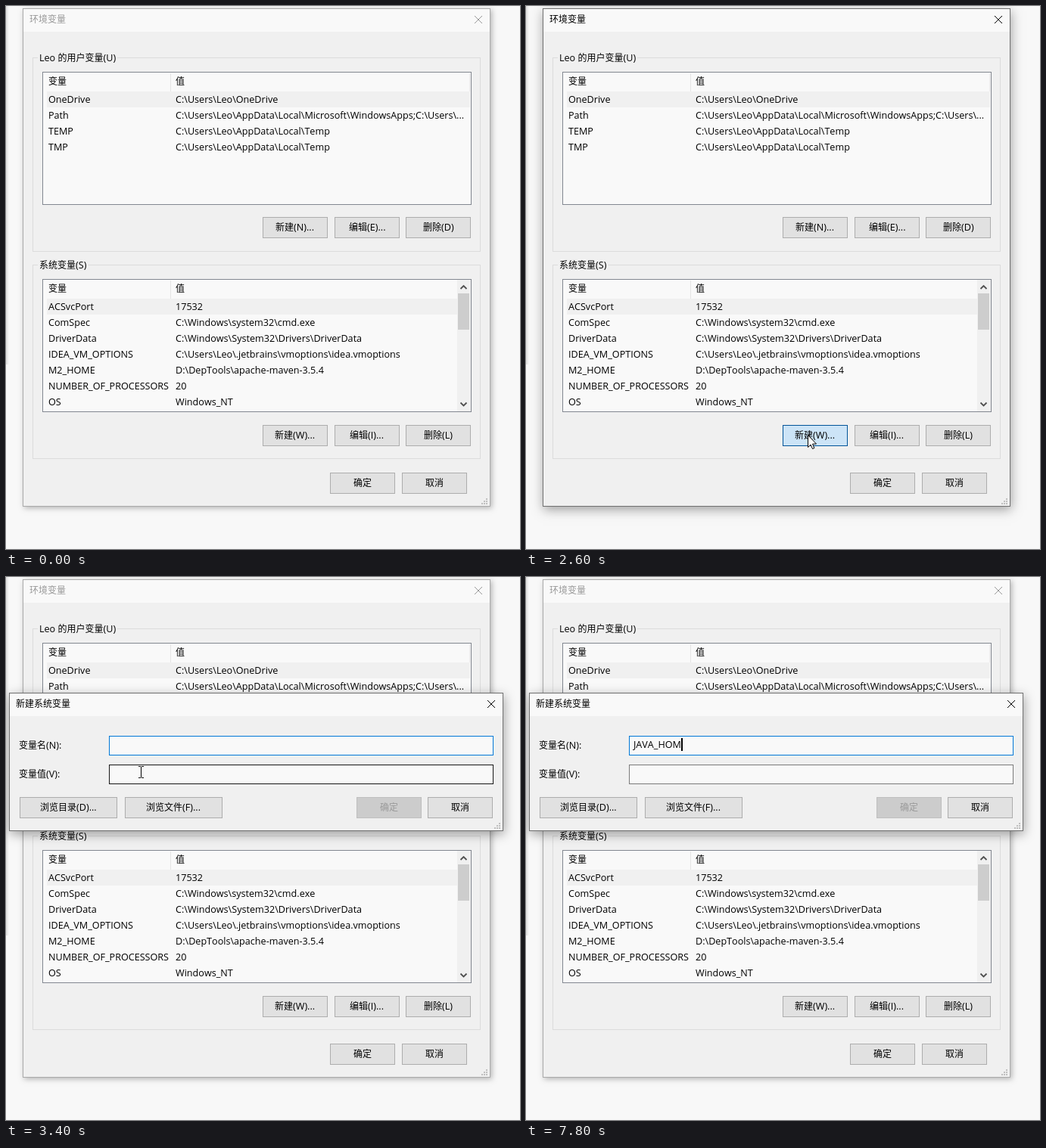
An HTML page with a canvas for the animation above (8000 ms loop, 679 px wide and 718 px high).

```html
<!DOCTYPE html>
<html lang="zh-CN">
<head>
<meta charset="utf-8">
<style>
html, body { margin: 0; width: 100%; height: 100%; overflow: hidden; background: #f8f8f8; }
canvas { display: block; }
</style>
</head>
<body>
<canvas id="stage" width="679" height="718"></canvas>
<script>
const stage = document.getElementById('stage').getContext('2d');
const layer = stage.canvas.cloneNode().getContext('2d');
let ctx = stage;
const LOOP = 8000, STEP = 100;
const LATIN = '12.6px "Open Sans", "Noto Sans", sans-serif';
const HAN = '12px "Noto Sans CJK SC", "Noto Sans CJK", sans-serif';
const PAPER = '#f9f9f9', FACE = '#f0f0f0', BLUE = '#0078d7';

const userVars = [
  ['OneDrive', 'C:\\Users\\Leo\\OneDrive'],
  ['Path', 'C:\\Users\\Leo\\AppData\\Local\\Microsoft\\WindowsApps;C:\\Users\\...'],
  ['TEMP', 'C:\\Users\\Leo\\AppData\\Local\\Temp'],
  ['TMP', 'C:\\Users\\Leo\\AppData\\Local\\Temp']
];
const systemVars = [
  ['ACSvcPort', '17532'],
  ['ComSpec', 'C:\\Windows\\system32\\cmd.exe'],
  ['DriverData', 'C:\\Windows\\System32\\Drivers\\DriverData'],
  ['IDEA_VM_OPTIONS', 'C:\\Users\\Leo\\.jetbrains\\vmoptions\\idea.vmoptions'],
  ['M2_HOME', 'D:\\DepTools\\apache-maven-3.5.4'],
  ['NUMBER_OF_PROCESSORS', '20'],
  ['OS', 'Windows_NT']
];

// time, x, y of the pointer tip
const pointerPath = [
  [200, 631, 185], [400, 631, 185], [500, 628, 176], [1300, 392, 572],
  [1400, 388, 576], [1500, 372, 575], [1600, 362, 570], [1700, 372, 567],
  [2900, 372, 567], [3400, 178, 258], [4000, 182, 227], [LOOP, 182, 227]
];
const typed = 'JAVA_HOM';
const keyTimes = [5300, 5500, 5700, 5800, 7000, 7400, 7500, 7800];
// spans in which the caret shows
const caretOn = [[2800, 3400], [4400, 4900], [5300, 6300], [6800, LOOP]];

function rect(x, y, w, h, color) {
  ctx.fillStyle = color;
  ctx.fillRect(x, y, w, h);
}

function box(x, y, w, h, fill, border) {
  rect(x, y, w, h, border);
  rect(x + 1, y + 1, w - 2, h - 2, fill);
}

function line(points, color, width = 1) {
  ctx.beginPath();
  points.forEach(([x, y]) => ctx.lineTo(x, y));
  ctx.strokeStyle = color;
  ctx.lineWidth = width;
  ctx.stroke();
}

// Splits Chinese and Latin runs, which differ in size
function runs(str) {
  return str.match(/[\u4e00-\u9fff]+|[^\u4e00-\u9fff]+/g) || [];
}

function setFont(run) {
  ctx.font = /[\u4e00-\u9fff]/.test(run) ? HAN : LATIN;
  ctx.fontKerning = 'none';
}

function measure(str) {
  return runs(str).reduce((w, run) => (setFont(run), w + ctx.measureText(run).width), 0);
}

function text(str, x, y, color = '#000') {
  for (const run of runs(str)) {
    setFont(run);
    ctx.fillStyle = color;
    ctx.fillText(run, x, y + 4);
    x += ctx.measureText(run).width;
  }
}

function button(label, x, y, w, look = 'normal') {
  const [fill, border, ink] = {
    normal: ['#e1e1e1', '#adadad', '#000'],
    hover: ['#e5f1fb', BLUE, '#000'],
    pressed: ['#cce4f7', '#005499', '#000'],
    disabled: ['#cccccc', '#bfbfbf', '#9a9a9a']
  }[look];
  box(x, y, w, 28, fill, border);
  text(label, Math.round(x + (w - measure(label)) / 2), y + 14, ink);
}

function frame(x, y, w, h, title, active) {
  ctx.save();
  ctx.shadowColor = active ? 'rgba(0,0,0,.36)' : 'rgba(0,0,0,.28)';
  ctx.shadowBlur = active ? 14 : 7;
  ctx.shadowOffsetX = active ? 1 : 2;
  ctx.shadowOffsetY = active ? 4 : 2;
  rect(x, y, w, h, active ? '#707070' : '#aaaaaa');
  ctx.restore();
  rect(x + 1, y + 1, w - 2, h - 2, FACE);
  rect(x + 1, y + 1, w - 2, 30, PAPER);
  const ink = active ? '#000' : '#999';
  text(title, x + 9, y + 15, ink);
  const cx = x + w - 16, cy = y + 15;
  line([[cx - 5, cy - 5], [cx + 5, cy + 5]], ink);
  line([[cx + 5, cy - 5], [cx - 5, cy + 5]], ink);
  for (let i = 0; i < 3; i++)
    for (let j = 2 - i; j < 3; j++)
      rect(x + w - 12 + j * 3, y + h - 11 + i * 3, 2, 2, '#bfbfbf');
}

function group(label, y, h) {
  box(35, y, 592, h, FACE, '#dcdcdc');
  rect(42, y, measure(label) + 4, 1, FACE);
  text(label, 44, y + 1);
}

function list(y, rows, rowEnd) {
  box(48, y, 567, 176, PAPER, '#828790');
  rect(217, y + 2, 1, 24, '#e5e5e5');
  text('变量', 56, y + 13);
  text('值', 224, y + 13);
  rect(54, y + 26, rowEnd - 54, 21, FACE);
  rows.forEach(([name, value], i) => {
    text(name, 56, y + 37 + i * 21);
    text(value, 224, y + 37 + i * 21);
  });
}

function scrollbar() {
  rect(596, 362, 18, 174, FACE);
  rect(597, 380, 15, 48, '#cdcdcd');
  line([[600.5, 374], [604.5, 370], [608.5, 374]], '#505050', 1.8);
  line([[600.5, 524.5], [604.5, 528.5], [608.5, 524.5]], '#505050', 1.8);
}

function mainWindow(active, newLook) {
  frame(22, 3, 618, 659, '环境变量', active);
  group('Leo 的用户变量(U)', 68, 257);
  list(87, userVars, 613);
  rect(612, 89, 1, 24, '#e5e5e5');
  group('系统变量(S)', 342, 257);
  list(361, systemVars, 596);
  scrollbar();
  button('新建(N)...', 339, 279, 86);
  button('编辑(E)...', 434, 279, 86);
  button('删除(D)', 528, 279, 86);
  button('新建(W)...', 339, 554, 86, newLook);
  button('编辑(I)...', 434, 554, 86);
  button('删除(L)', 528, 554, 86);
  button('确定', 428, 617, 86);
  button('取消', 523, 617, 86);
}

function dialog(t, over) {
  frame(4, 153, 653, 183, '新建系统变量', true);
  text('变量名(N):', 17, 223);
  text('变量值(V):', 17, 261);
  box(136, 210, 508, 26, PAPER, BLUE);
  box(136, 248, 508, 26, PAPER, over(136, 248, 508, 26) ? '#171717' : '#7a7a7a');
  const look = (x, w) => over(x, 291, w, 28) ? 'hover' : 'normal';
  button('浏览目录(D)...', 18, 291, 129, look(18, 129));
  button('浏览文件(F)...', 157, 291, 129, look(157, 129));
  button('确定', 463, 291, 86, 'disabled');
  button('取消', 557, 291, 86, look(557, 86));

  const word = typed.slice(0, keyTimes.filter(k => k <= t).length);
  text(word, 142, 222);
  if (caretOn.some(([a, b]) => t >= a && t < b))
    rect(word ? Math.round(142 + measure(word)) : 140, 213, 2, 17, '#000');
}

// Draws the dialog on its own layer, so that it fades and grows as one piece
function openDialog(t, over) {
  ctx = layer;
  ctx.clearRect(0, 0, 679, 718);
  dialog(t, over);
  ctx = stage;

  const k = Math.min(1, (t - 2700) / 300);
  const scale = 1 - 0.08 * (1 - k) ** 3;
  ctx.save();
  ctx.globalAlpha = 1 - (1 - k) ** 2.4;
  ctx.translate(330.5, 244.5);
  ctx.scale(scale, scale);
  ctx.drawImage(layer.canvas, -330.5, -244.5);
  ctx.restore();
}

function pointerAt(t) {
  const i = Math.max(1, pointerPath.findIndex(p => p[0] > t));
  const [t0, x0, y0] = pointerPath[i - 1], [t1, x1, y1] = pointerPath[i];
  const u = Math.max(0, (t - t0) / (t1 - t0)), e = u * u * (3 - 2 * u);
  return [Math.round(x0 + (x1 - x0) * e), Math.round(y0 + (y1 - y0) * e)];
}

function shape(x, y, points) {
  ctx.beginPath();
  points.forEach(([dx, dy]) => ctx.lineTo(x + dx, y + dy));
  ctx.closePath();
  ctx.fillStyle = '#fff';
  ctx.fill();
  ctx.strokeStyle = '#000';
  ctx.lineWidth = 1;
  ctx.stroke();
}

function arrow(x, y) {
  shape(x + .5, y + .5, [[0, 0], [0, 16], [3.6, 12.6], [6, 18], [8.4, 17], [6, 11.7], [11, 11.5]]);
}

function resizer(x, y) {
  shape(x, y, [[-11, 0], [-7, -4], [-7, -1], [7, -1], [7, -4], [11, 0],
    [7, 4], [7, 1], [-7, 1], [-7, 4]]);
}

function beam(x, y) {
  rect(x, y - 7, 1, 14, '#000');
  for (const end of [y - 8, y + 7]) {
    rect(x - 3, end, 3, 1, '#000');
    rect(x + 1, end, 3, 1, '#000');
  }
}

function draw(t) {
  const [px, py] = pointerAt(t);
  const over = (x, y, w, h) => t >= 200 && t < 5300 &&
    px >= x && px < x + w && py >= y && py < y + h;
  const open = t >= 2800;

  rect(0, 0, 679, 718, '#f8f8f8');
  const edge = ctx.createLinearGradient(0, 0, 4, 0);
  edge.addColorStop(0, '#dcdcdc');
  edge.addColorStop(1, '#f8f8f8');
  rect(0, 0, 4, 474, edge);

  const hovered = !open && over(339, 554, 86, 28);
  mainWindow(t >= 2600 && !open, !hovered ? 'normal' : t === 2600 ? 'pressed' : 'hover');
  if (open) openDialog(t, over);

  if (t === 100) resizer(639.5, 171.5);
  if (t < 200 || t >= 5300) return;
  const inField = open && (over(136, 210, 508, 26) || over(136, 248, 508, 26));
  (inField ? beam : arrow)(px, py);
}

function tick(now) {
  draw(Math.floor(now % LOOP / STEP) * STEP);
  requestAnimationFrame(tick);
}
requestAnimationFrame(tick);
</script>
</body>
</html>
```
